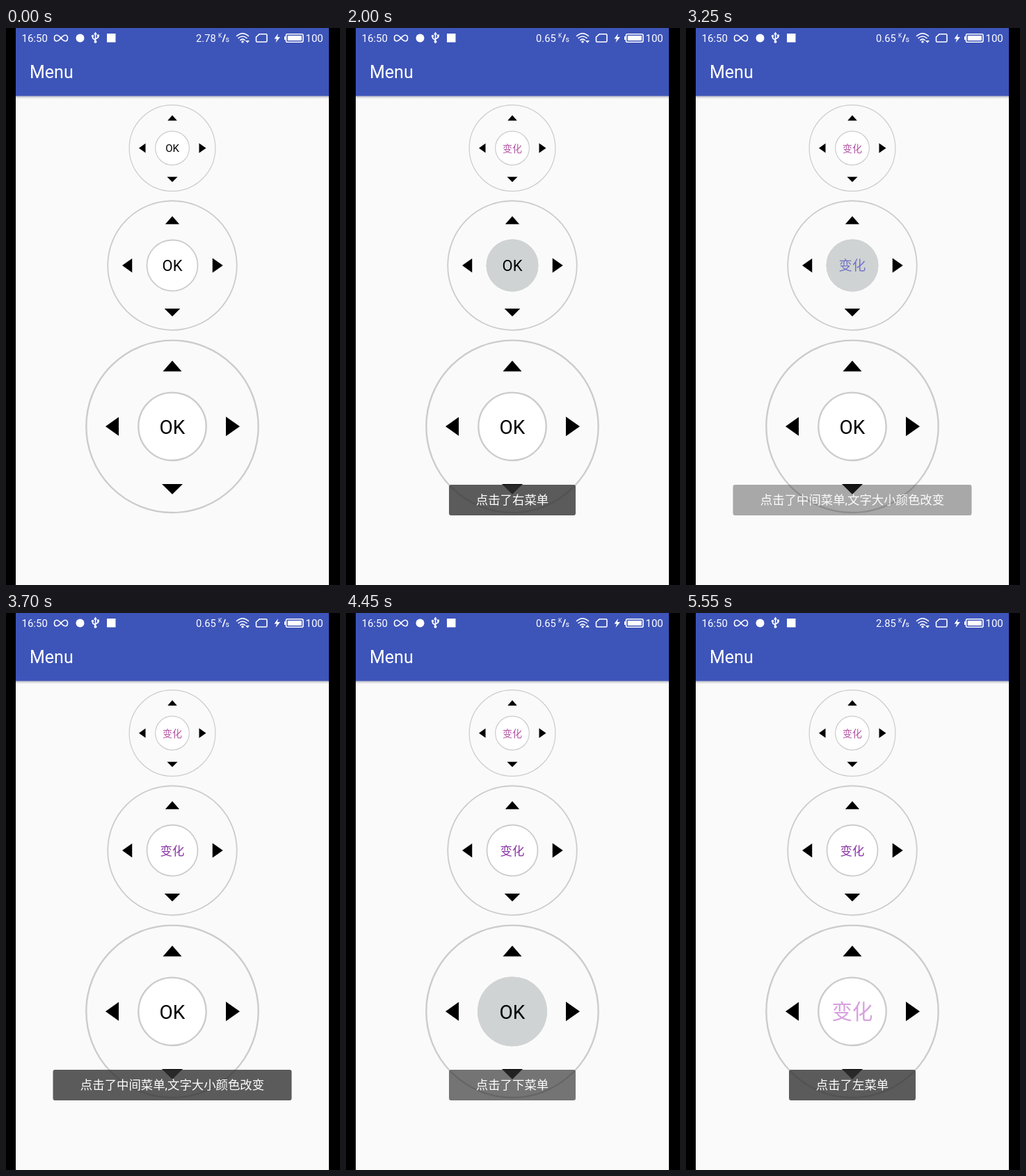
An HTML page for the animation above (5600 ms loop, 480 by 800 pixels).

```html
<!DOCTYPE html>
<html lang="zh-CN">
<head>
<meta charset="utf-8">
<title>Menu</title>
<style>
  html, body { margin: 0; width: 100%; height: 100%; overflow: hidden; background: #000; }
  svg { display: block; width: 480px; height: 800px; }
  text { font-family: Roboto, 'Noto Sans CJK SC', 'Noto Sans CJK', sans-serif; }
  .mid { text-anchor: middle; }
  .line { fill: none; stroke: #fff; stroke-width: 1.6; stroke-linecap: round; stroke-linejoin: round; }
</style>
</head>
<body>
<svg viewBox="0 0 480 800">
  <defs>
    <linearGradient id="shade" x2="0" y2="1">
      <stop stop-color="#8f95ad"/>
      <stop offset=".4" stop-color="#d3d4da"/>
      <stop offset="1" stop-color="#fafafa"/>
    </linearGradient>
  </defs>
  <rect width="480" height="800"/>
  <rect x="14" width="450" height="800" fill="#fafafa"/>
  <rect x="14" y="97" width="450" height="5" fill="url(#shade)"/>
  <rect x="14" width="450" height="97.5" fill="#3d54b9"/>
  <text x="34" y="72.3" font-size="25" fill="#fff">Menu</text>

  <g id="status" fill="#fff" font-size="15">
    <text x="22.5" y="20">16:50</text>
    <path class="line" stroke-width="2" d="M79 14.5C76 11 74 10 72.500 10.200C68.500 10.500 68.500 18.500 72.500 18.800C74 19 76 18 79 14.500C82 11 84 10 85.500 10.200C89.500 10.500 89.500 18.500 85.500 18.800C84 19 82 18 79 14.500"/>
    <circle cx="106.500" cy="14.500" r="6"/>
    <path class="line" stroke-width="1.3" d="M128.500 8V19M128.500 17.500L124.500 14.500V12M128.500 16L132.500 13.500V11"/>
    <path d="M128.500 5.500L131 9.500H126ZM131 9.500H134V12.500H131Z"/>
    <circle cx="124.500" cy="11.500" r="1.700"/><circle cx="128.500" cy="19.800" r="2"/>
    <rect x="145" y="8" width="12.500" height="12.500"/>
    <text id="speed" x="273" y="20" font-size="14.700"></text>
    <text x="305" y="14" font-size="8.500">K</text>
    <path class="line" stroke-width="1" d="M311.500 19.500L315 9.500"/>
    <text x="315.500" y="20" font-size="10.500">s</text>
    <path class="line" d="M331.500 11.500Q340 4 348.500 11.500M334 14.500Q340 9.500 346 14.500M336.800 17.300Q340 15 343.200 17.300"/>
    <circle cx="340" cy="19.800" r="1.700"/>
    <path id="traffic"/>
    <path class="line" d="M364 8.800H373.500Q375 8.800 375 10.300V18.500Q375 20 373.500 20H361Q359.500 20 359.500 18.500V13Z"/>
    <path d="M391 8L385.500 15.500H389L387.500 21L394 13H390Z"/>
    <rect class="line" x="402.500" y="8.800" width="24.500" height="11.400" rx="2"/>
    <rect x="404.800" y="11" width="20" height="7"/><rect x="400" y="12" width="2" height="5"/>
    <text x="430.500" y="20">100</text>
  </g>
  <g id="pads"></g>
  <g id="toast">
    <rect y="656" height="44" rx="3" fill="#343434" fill-opacity=".8"/>
    <text class="mid" x="239" y="684.300" font-size="17.400" fill="#fff"></text>
  </g>
</svg>
<script>
const LOOP = 5600;
const GREY = '#cfd3d3';
const $ = id => document.getElementById(id);

// label steps: [time, text, size, colour]
const PADS = [
  { y: 172.5, scale: .5, labels: [[0, 'OK', 15, '#000'], [1850, '变化', 14, '#b455a5']] },
  { y: 341, scale: .75, labels: [[0, 'OK', 22, '#000'], [2350, '变化', 19.4, '#7474c4'], [3400, '变化', 17.4, '#8b35a5']] },
  { y: 572.3, scale: 1, labels: [[0, 'OK', 28, '#000'], [4600, '变化', 29.4, '#d8a0e0']] },
];

// [pad, part, down, up]
const PRESSES = [
  [0, 'up', 50, 150], [0, 'right', 650, 900], [0, 'down', 1150, 1400], [0, 'ok', 1650, 1850],
  [1, 'ok', 2000, 2350], [1, 'up', 2400, 2600], [1, 'right', 2600, 2750], [1, 'ok', 3150, 3400], [1, 'left', 3550, 3700],
  [2, 'up', 3750, 4000], [2, 'right', 4100, 4300], [2, 'ok', 4400, 4600], [2, 'down', 4750, 4950], [2, 'left', 5300, 5550],
];

// [text, left edge, fade-in start, fade-out start]
const TOASTS = [
  ['点击了上菜单', 148, 275, 1375],
  ['点击了右菜单', 148, 1650, 2925],
  ['点击了中间菜单,文字大小颜色改变', 67.5, 3175, 4050],
  ['点击了下菜单', 148, 4300, 4990],
  ['点击了左菜单', 148, 5240, LOOP],
];
const FADE = 250;

const SPEEDS = [[0, '2.78'], [100, '0.51'], [1150, '0.65'], [4750, '2.85']];
const TRAFFIC = [[0, 'down'], [900, 'up'], [1200, 'down'], [4000, 'up'], [4800, 'down']];
const ARROWS = { up: 'M347 17L350 20.500H344Z', down: 'M347 21.500L350 18H344Z' };

const stepAt = (steps, t) => steps.filter(s => s[0] <= t).pop();

const TURNS = { right: 0, down: 90, left: 180, up: 270 };
const polar = (r, deg) => {
  const a = deg * Math.PI / 180;
  return `${r * Math.cos(a)} ${r * Math.sin(a)}`;
};
const sector = turn =>
  `M${polar(49, turn - 45)}L${polar(125, turn - 45)}A125 125 0 0 1 ${polar(125, turn + 45)}` +
  `L${polar(49, turn + 45)}A49 49 0 0 0 ${polar(49, turn - 45)}Z`;

$('pads').innerHTML = PADS.map(({ y, scale }) => `
  <g transform="translate(239 ${y})">
    <g transform="scale(${scale})">
      <circle r="123.7" fill="none" stroke="#ccc" stroke-width="2.4"/>
      ${Object.entries(TURNS).map(([part, turn]) =>
        `<path data-part="${part}" d="${sector(turn)}" fill="${GREY}"/>`).join('')}
      <circle r="48.7" fill="#fff" stroke="#ccc" stroke-width="2.4"/>
      <circle data-part="ok" r="49.9" fill="${GREY}"/>
      <path d="M0 -94.500L13.500 -79H-13.500ZM0 97.500L15 82.700H-15ZM-96 0L-77 -13.500V13.500ZM97 0L77 -14V14Z"/>
    </g>
    <text class="mid"></text>
  </g>`).join('');
const padNodes = [...$('pads').children];
const [toastBox, toastText] = $('toast').children;

function drawPad(node, index, t) {
  const active = PRESSES.filter(([pad, , down, up]) => pad === index && t >= down && t < up).map(p => p[1]);
  node.querySelectorAll('[data-part]').forEach(part =>
    part.setAttribute('visibility', active.includes(part.dataset.part) ? 'visible' : 'hidden'));
  const [, text, size, colour] = stepAt(PADS[index].labels, t);
  const label = node.lastElementChild;
  label.textContent = text;
  label.setAttribute('font-size', size);
  label.setAttribute('fill', colour);
  label.setAttribute('y', size * (text === 'OK' ? .365 : .375));
}

function drawToast(t) {
  const toast = TOASTS.find(([, , start, end]) => t >= start && t < end + FADE);
  $('toast').setAttribute('visibility', toast ? 'visible' : 'hidden');
  if (!toast) return;
  const [text, left, start, end] = toast;
  const fadeIn = 1 - (1 - Math.min(1, (t - start) / FADE)) ** 2;
  const fadeOut = 1 - Math.max(0, (t - end) / FADE) ** 2;
  toastBox.setAttribute('x', left);
  toastBox.setAttribute('width', 2 * (239 - left));
  toastText.textContent = text;
  $('toast').setAttribute('opacity', Math.min(fadeIn, fadeOut));
}

function render(t) {
  padNodes.forEach((node, i) => drawPad(node, i, t));
  drawToast(t);
  $('speed').textContent = stepAt(SPEEDS, t)[1];
  $('traffic').setAttribute('d', ARROWS[stepAt(TRAFFIC, t)[1]]);
}

const begin = performance.now();
function tick() {
  render((performance.now() - begin) % LOOP);
  requestAnimationFrame(tick);
}
tick();
</script>
</body>
</html>
```
